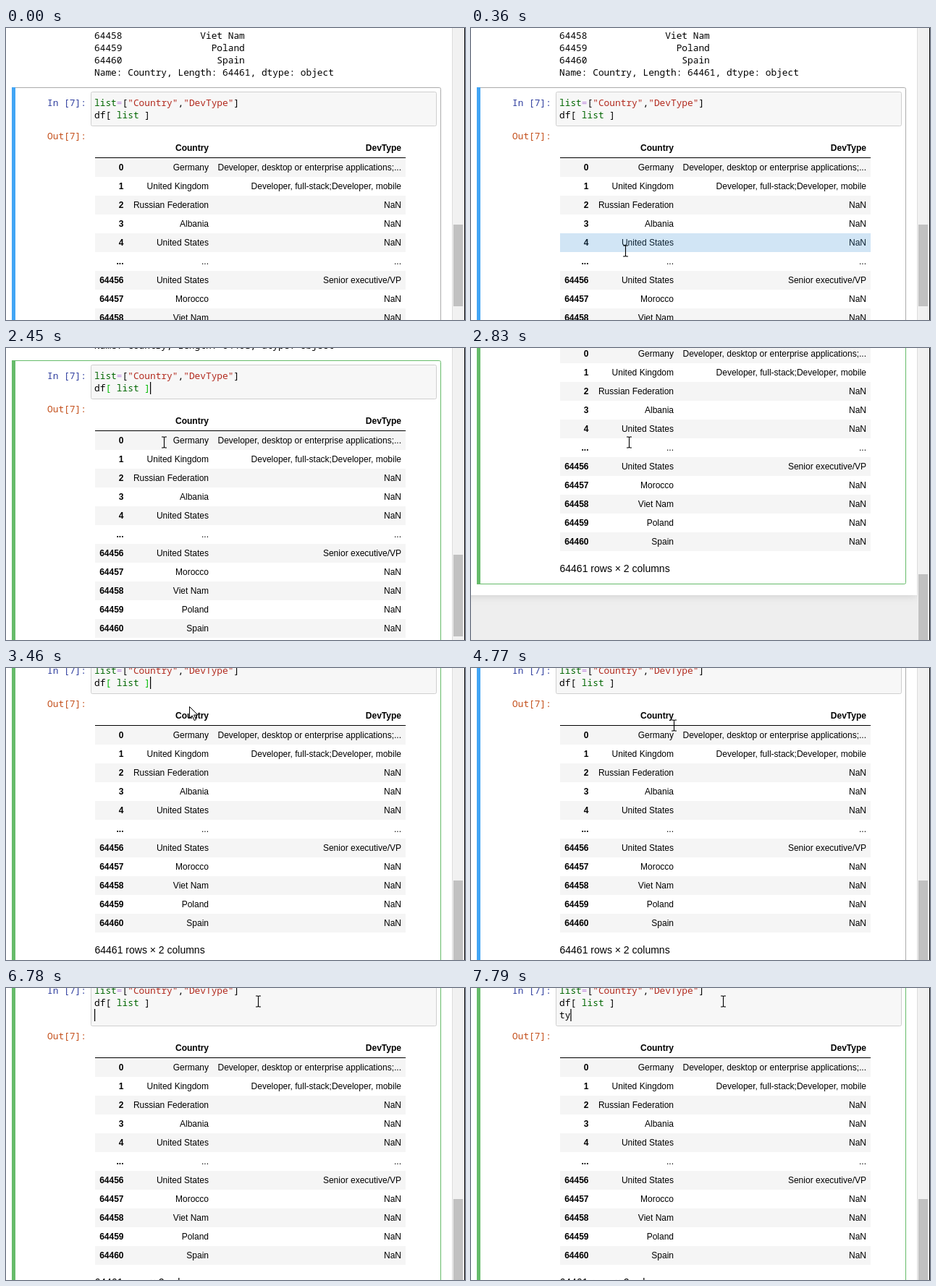
Write an HTML page that moves like this. It is 634 px wide and 404 px high and loops after 8000 ms.

```html
<!DOCTYPE html>
<html lang="en">
<head>
<meta charset="utf-8">
<title>Notebook cell</title>
<style>
html, body { margin: 0; width: 100%; height: 100%; overflow: hidden; background: #eee; }
svg { display: block; }
text { font: 12px "Liberation Sans", Arial, sans-serif; white-space: pre; }
.code { font: 12.83px "Noto Sans Mono", monospace; }
.b { font-weight: bold; }
.r { text-anchor: end; }
.builtin { fill: #060; }
.op { fill: #c08ae0; }
.str { fill: #b22a1e; }
.page { fill: #fff; filter: drop-shadow(0 0 6px rgba(87, 87, 87, .25)); }
.match .br { fill: #0b0; }
</style>
</head>
<body>
<svg width="634" height="404" viewBox="0 0 634 404">
  <rect width="634" height="404" fill="#eee"/>
  <g id="doc">
    <rect id="page" class="page" x="-20" y="-100" width="636" height="627"/>
    <g id="log"></g>
    <rect id="frame" x="8.5" y="82.5" width="592" height="429" rx="2" fill="#fff"/>
    <rect id="bar" x="8" y="82" width="5" height="430"/>
    <text class="code" x="57" y="108" fill="#303f9f">In [7]:</text>
    <rect id="input" x="117.5" y="88.5" width="477" height="47" rx="2" fill="#f7f7f7" stroke="#cfcfcf"/>
    <path id="sel" fill="#d7d4f0"/>
    <text class="code" x="122" y="108"><tspan class="builtin">list</tspan><tspan class="op">=</tspan>[<tspan class="str">"Country"</tspan>,<tspan class="str">"DevType"</tspan>]</text>
    <text id="line2" class="code" x="122" y="125">df<tspan class="br">[</tspan> <tspan class="builtin">list</tspan> <tspan class="br">]</tspan></text>
    <text id="typed" class="code" x="122" y="142"></text>
    <rect id="caret" width="1.2" height="17"/>
    <g id="out">
      <text class="code" x="57" y="154" fill="#c4501c">Out[7]:</text>
      <g id="table"></g>
      <rect id="hover" x="123" width="429" height="26" fill="#42a5f5" opacity=".2"/>
      <text x="122.5" y="495" style="font-size:14px">64461 rows × 2 columns</text>
    </g>
  </g>
  <rect x="617" width="15" height="404" fill="#f1f1f1"/>
  <rect id="thumb" x="618" width="13" height="113" fill="#c1c1c1"/>
  <rect x="632" width="1" height="404" fill="#fff"/>
  <rect x="633" width="1" height="404"/>
  <g id="mouse">
    <circle id="press" r="12" fill="#ffee2e" opacity=".7"/>
    <path id="beam" d="M-3.5-7.5h2.5l1 .8 1-.8h2.5M0-7V7M-3.5 7.5h2.5l1-.8 1 .8h2.5" fill="none" stroke="#000" stroke-width="1.1"/>
    <path id="arrow" d="M0 0V16l3.7-3.6 2.9 6.6 2.4-1-2.9-6.5h5.4z" fill="#fff" stroke="#000"/>
  </g>
</svg>
<script>
const LOOP = 8000, CHAR = 7.7, LINE = 17, ROW = 26, TOP = 180, LEFT = 122, BLINK = 530;
// Moments of the recorded session, in ms.
const DRAG = 1240, CLICK = 1940, BLUR = 4540, FOCUS = 6020, ENTER = 6780, KEYS = [7560, 7790];

const $ = id => document.getElementById(id);
const set = (id, attrs) => { for (const k in attrs) $(id).setAttribute(k, attrs[k]); };
const show = (id, on) => { $(id).style.display = on ? '' : 'none'; };
const within = (t, a, b) => t >= a && t < b;
const text = (x, y, s, cls) => `<text class="${cls}" x="${x}" y="${y}">${s}</text>`;
const ease = (t, from, to) => {
  const p = Math.min(1, Math.max(0, (t - from) / (to - from)));
  return p * p * (3 - 2 * p);
};

const countries = ['Germany', 'United Kingdom', 'Russian Federation', 'Albania', 'United States',
  '...', 'United States', 'Morocco', 'Viet Nam', 'Poland', 'Spain'];
const jobs = {
  0: 'Developer, desktop or enterprise applications;...',
  1: 'Developer, full-stack;Developer, mobile',
  5: '...',
  6: 'Senior executive/VP'
};
const label = i => i < 5 ? i : i > 5 ? 64450 + i : '...';

$('log').innerHTML = countries.slice(-3)
  .map((name, i) => label(8 + i) + name.padStart(22))
  .concat('Name: Country, Length: 64461, dtype: object')
  .map((s, i) => text(LEFT, 15 + LINE * i, s, 'code')).join('');

const tableLine = (y, index, country, job, cls) =>
  text(162.5, y, index, 'b r') + text(280, y, country, cls) + text(546, y, job, cls);

$('table').innerHTML = tableLine(170, '', 'Country', 'DevType', 'b r') +
  countries.map((country, i) => {
    const y = TOP + ROW * i;
    const stripe = i % 2 ? '' : `<rect x="123" y="${y}" width="429" height="${ROW}" fill="#f5f5f5"/>`;
    return stripe + tableLine(y + 17, label(i), country, jobs[i] || 'NaN', 'r');
  }).join('') +
  '<rect x="123" y="179" width="429" height="1"/>';

// Two wheel notches down, one back up.
const scrollAt = t =>
  Math.round(100 * (ease(t, 2224, 2600) + ease(t, 2755, 2855) - ease(t, 3150, 3400)));

function mouseAt(t) {
  let x = 250, y = 400;
  const glide = (from, to, nx, ny) => {
    const p = ease(t, from, to);
    x += (nx - x) * p;
    y += (ny - y) * p;
  };
  glide(70, 860, 130, 100);
  glide(DRAG, 1360, 239, 116);
  glide(1700, 1900, 210, 119);
  glide(2280, 2450, 218, 130);
  glide(2900, 3400, 253, 53);
  glide(3600, 4240, 236, 65);
  glide(4600, 5310, 537, 163);
  glide(5390, 5620, 376, 13);
  glide(5790, 5950, 348, 18);
  return [Math.round(x), Math.round(y)];
}

function draw(t) {
  const scroll = scrollAt(t);
  const [mx, my] = mouseAt(t);
  const extra = t >= ENTER ? LINE : 0;
  const typed = KEYS.filter(k => k <= t).length;
  const edit = within(t, DRAG, BLUR) || t >= FOCUS;
  const caretOn = within(t, CLICK, BLUR) || t >= FOCUS;
  const color = edit ? '#66bb6a' : '#42a5f5';

  set('doc', { transform: `translate(0 ${-scroll})` });
  set('out', { transform: `translate(0 ${extra})` });
  set('page', { height: 627 + extra });
  set('frame', { height: 429 + extra, stroke: edit ? color : '#ababab' });
  set('bar', { height: 430 + extra, fill: color });
  set('input', { height: 47 + extra });
  set('thumb', { y: Math.round(272 + scroll * .223) - (extra ? 2 : 0) });

  // The drag covers part of line 1 until it drops to line 2.
  set('sel', { d: my < 112 ? `M${LEFT} 95H${mx}v17H${LEFT}z` : `M${LEFT} 95H590v17H199v17H${LEFT}z` });
  show('sel', within(t, DRAG, CLICK));

  $('line2').classList.toggle('match', caretOn && !extra);
  $('typed').textContent = 'ty'.slice(0, typed);

  // Every click or key restarts the blink.
  const last = Math.max(...[CLICK, FOCUS, ENTER, ...KEYS].filter(k => k <= t));
  show('caret', caretOn && Math.floor((t - last) / BLINK) % 2 === 0);
  set('caret', { x: LEFT + CHAR * (extra ? typed : 10), y: 112 + extra });

  const row = Math.floor((my - TOP) / ROW);
  set('hover', { y: TOP + ROW * row });
  show('hover', within(t, 70, 900) && row >= 0);

  const arrow = within(t, 3200, 4100);
  show('mouse', t >= 70);
  show('arrow', arrow);
  show('beam', !arrow);
  show('press', within(t, DRAG, 1500) ||
    [CLICK, BLUR, FOCUS].some(c => within(t, c, c + 100)));
  set('mouse', { transform: `translate(${mx + .5} ${my + .5})` });
}

function tick() {
  draw(performance.now() % LOOP);
  requestAnimationFrame(tick);
}
tick();
</script>
</body>
</html>
```
